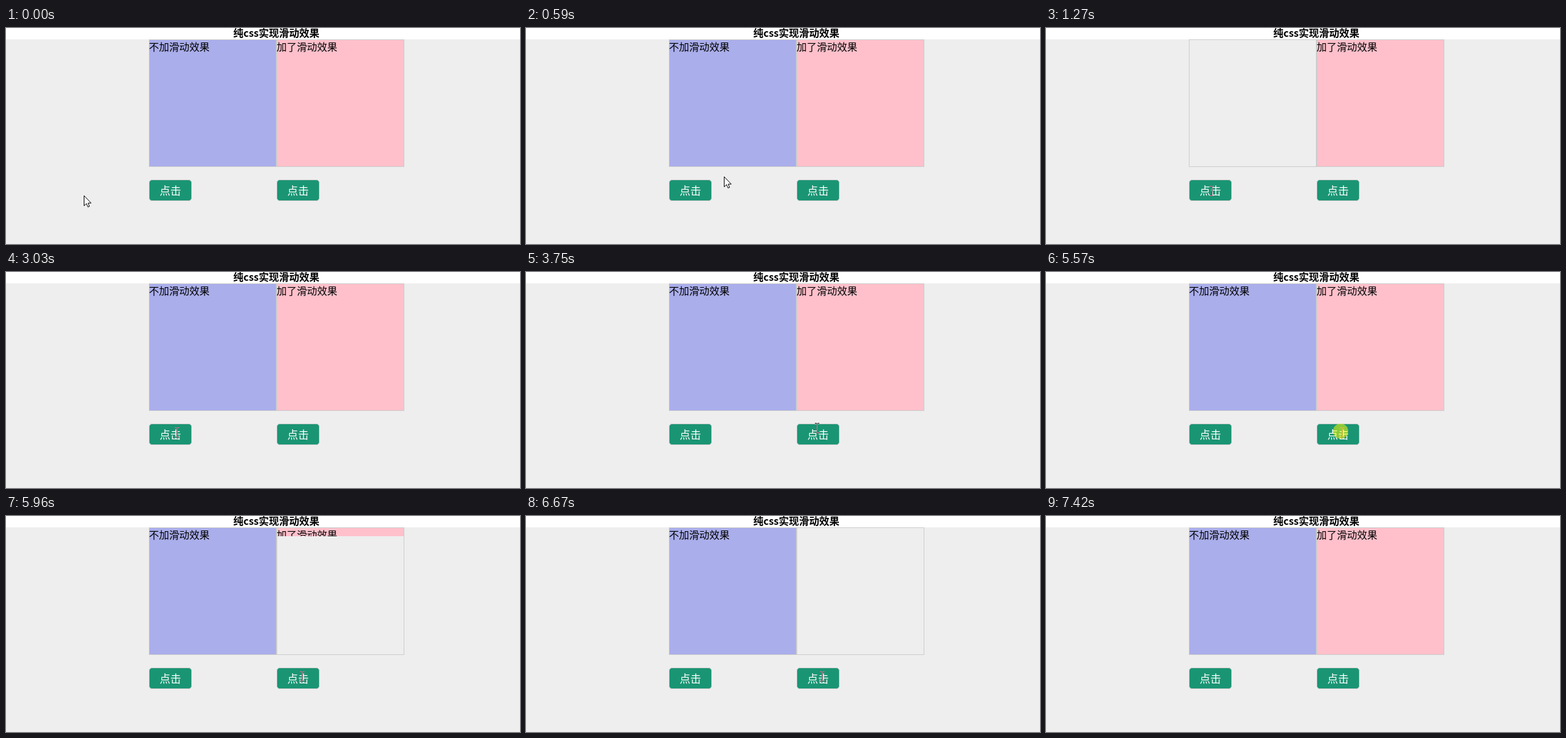
Recreate the animation shown at these times as an HTML page with a canvas. Size 813 by 342 pixels, loop 8250 ms.

```html
<!DOCTYPE html>
<html lang="zh-CN">
<head>
<meta charset="utf-8">
<title>纯css实现滑动效果</title>
<style>
  html, body { margin: 0; width: 100%; height: 100%; overflow: hidden; background: #eee; }
  canvas { display: block; width: 813px; height: 342px; }
</style>
</head>
<body>
<canvas id="stage" width="813" height="342"></canvas>
<script>
const LOOP = 8250;
const SLIDE = 500;      // duration of the closing transition
const SLIDE_LAG = 80;   // the closing panel is first repainted this late
const PRESS = 110;      // how long a click stays highlighted
const SIZE = 200;
const FONT = '"Noto Sans CJK SC", "Noto Sans CJK", "Noto Sans", sans-serif';
const ctx = document.getElementById('stage').getContext('2d', { alpha: false });
const arrow = new Path2D('M.5 .5V16.5L4.2 13L6.6 18.4L9 17.4L6.8 12.2H11.6Z');

// Each pointer move is one quadratic curve
const first = { start: 20, end: 840, from: [123, 265], via: [431, 191], to: [262, 258] };
const second = { start: 3030, end: 3850, from: [270, 254], via: [369, 168], to: [468, 254] };
const leave = { start: 7060, end: 7420, from: [468, 254], via: [580, 238], to: [707, 343] };

const clickTimes = [1120, 2230, 4620, 5570, 6540];
const plainHidden = { start: 1270, end: 2340 };
const slideHidden = [{ start: 3800, end: 4750 }, { start: 5615, end: 6700 }];

const during = (t, { start, end }) => t >= start && t < end;
const clamp = x => Math.min(1, Math.max(0, x));
const bezier = (a, b, c, d, u) => {
  const v = 1 - u;
  return a * v ** 3 + 3 * b * u * v * v + 3 * c * u * u * v + d * u ** 3;
};

// CSS "ease": cubic-bezier(.25, .1, .25, 1)
function ease(x) {
  let lo = 0, hi = 1;
  for (let i = 0; i < 20; i++) {
    const mid = (lo + hi) / 2;
    if (bezier(0, 0.25, 0.25, 1, mid) < x) lo = mid; else hi = mid;
  }
  return bezier(0, 0.1, 1, 1, lo);
}

function pointerAt(t) {
  const { start, end, from, via, to } =
    t < second.start ? first : t < leave.start ? second : leave;
  const k = clamp((t - start) / (end - start));
  const u = k * k * (3 - 2 * k);
  return from.map((p, i) =>
    Math.round(p * (1 - u) ** 2 + 2 * via[i] * u * (1 - u) + to[i] * u * u));
}

function slideHeight(t) {
  const phase = slideHidden.find(p => during(t, p));
  if (!phase || t < phase.start + SLIDE_LAG) return SIZE;
  return Math.round(SIZE * (1 - ease(clamp((t - phase.start) / SLIDE))));
}

function text(str, x, y, size, color, weight = 400) {
  ctx.font = `${weight} ${size}px ${FONT}`;
  ctx.fillStyle = color;
  ctx.fillText(str, x, y);
}

function panel(x, color, label, height) {
  ctx.strokeStyle = '#ccc';
  ctx.lineWidth = 1;
  ctx.strokeRect(x + 0.5, 18.5, SIZE + 1, SIZE + 1);
  ctx.save();
  ctx.beginPath();
  ctx.rect(x, 19, SIZE + 1, height);
  ctx.clip();
  ctx.fillStyle = color;
  ctx.fillRect(x + 1, 19, SIZE, SIZE);
  text(label, x, 36, 16, '#000');
  ctx.restore();
}

function button(x) {
  ctx.beginPath();
  ctx.roundRect(x + 0.5, 240.5, 67, 33, 4.5);
  ctx.fillStyle = '#1a9574';
  ctx.fill();
  ctx.strokeStyle = '#ccc';
  ctx.lineWidth = 1;
  ctx.stroke();
  text('点击', x + 17, 264, 17, '#fff');
}

function textCursor(x, y) {
  ctx.globalCompositeOperation = 'difference';
  ctx.fillStyle = '#fff';
  for (const row of [y - 8, y + 7]) {
    ctx.fillRect(x - 3, row, 3, 1);
    ctx.fillRect(x + 1, row, 3, 1);
  }
  ctx.fillRect(x, y - 7, 1, 14);
}

function arrowCursor(x, y) {
  ctx.translate(x, y);
  ctx.fillStyle = '#fff';
  ctx.fill(arrow);
  ctx.strokeStyle = '#000';
  ctx.lineWidth = 1;
  ctx.stroke(arrow);
}

function pointer(x, y) {
  const overText = y >= 246 && y <= 268 && [243, 445].some(left => x >= left && x <= left + 34);
  ctx.save();
  (overText ? textCursor : arrowCursor)(x, y);
  ctx.restore();
}

function highlight(x, y) {
  ctx.fillStyle = 'rgba(255, 255, 0, 0.5)';
  ctx.beginPath();
  ctx.arc(x, y, 12, 0, Math.PI * 2);
  ctx.fill();
}

function draw(t) {
  ctx.fillStyle = '#eee';
  ctx.fillRect(0, 0, 813, 342);
  ctx.fillStyle = '#fff';
  ctx.fillRect(0, 0, 813, 18);
  text('纯css实现滑动效果', 359.5, 14, 16, '#000', 700);

  panel(226, '#aaaeeb', '不加滑动效果', during(t, plainHidden) ? 0 : SIZE);
  panel(428, '#ffc0cb', '加了滑动效果', slideHeight(t));
  button(226);
  button(428);

  if (t >= leave.end) return;
  const [x, y] = pointerAt(t);
  pointer(x, y);
  if (clickTimes.some(start => during(t, { start, end: start + PRESS }))) {
    highlight(x - 2, y - 2);
  }
}

const began = performance.now();
function tick() {
  draw((performance.now() - began) % LOOP);
  requestAnimationFrame(tick);
}
tick();
</script>
</body>
</html>
```
